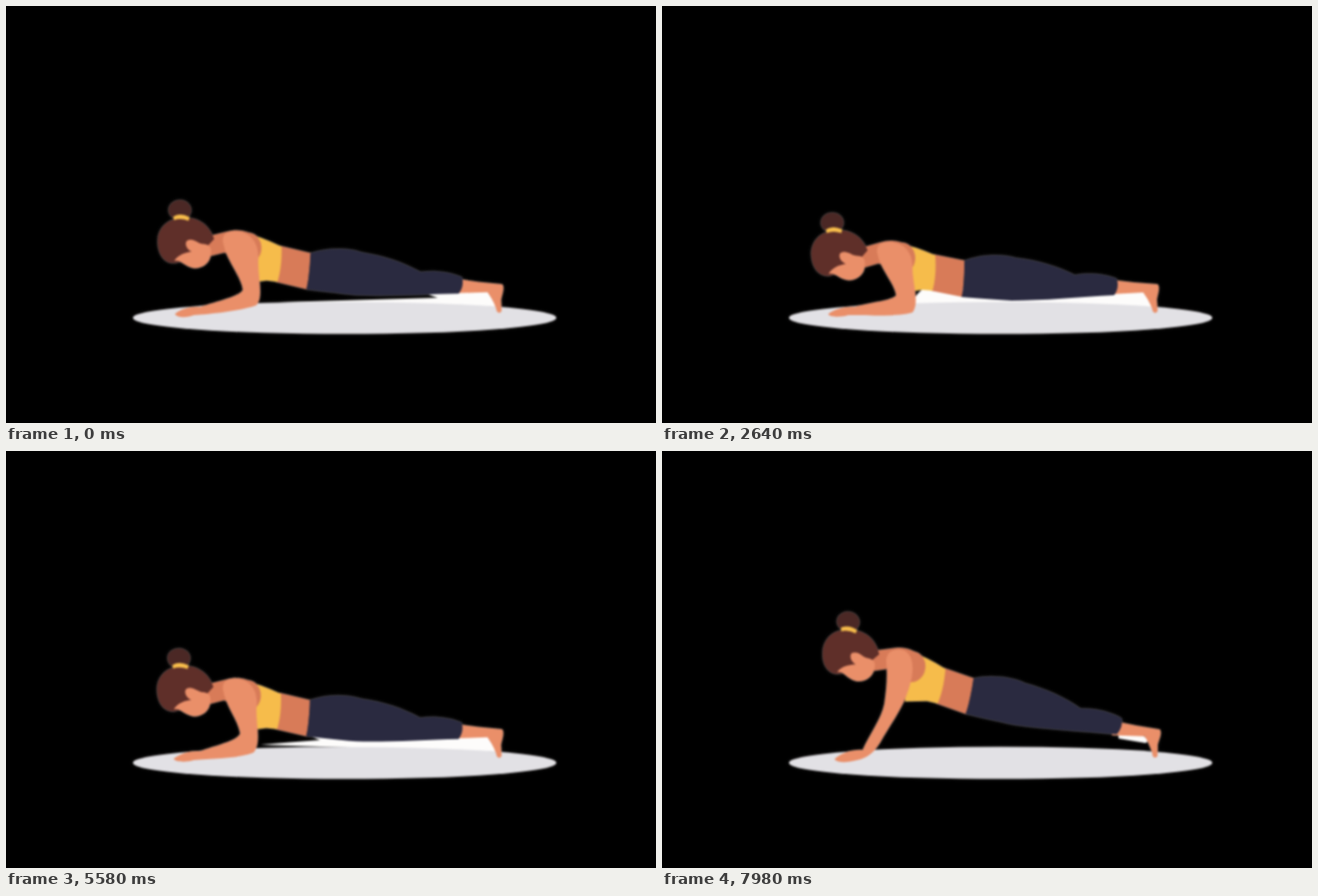
An HTML page without scripts for the animation above (8000 ms loop, 716 px wide and 460 px high).

```html
<!DOCTYPE html>
<html lang="en">
<head>
<meta charset="utf-8">
<title>Push-up</title>
<style>
  html, body { margin: 0; width: 100%; height: 100%; overflow: hidden; background: #000; }
  svg { display: block; width: 716px; height: 460px; }
  .scene { filter: blur(1.1px) drop-shadow(0 0 1.5px #4a4848); }
  .mat { fill: #e2e1e5; }
  .light { fill: #fdfcfb; }
  .skin { fill: #ea8f69; }
  .shade { fill: #d87b58; }
  .hair { fill: #5f2f29; }
  .bun { fill: #4b2825; }
  .top { fill: #f6bc4b; }
  .pants { fill: #2a2a40; }
</style>
</head>
<body>
<svg viewBox="0 0 716 460">
  <g class="scene">
    <!-- lit floor under the body -->
    <path class="light">
      <animate attributeName="d" dur="8s" repeatCount="indefinite"
        keyTimes="0; .09; .56; .6975; .8075; .94; 1"
        values="M450 312 L530 314 L541 332 L300 327 L476 322Z;
                M288 311 L530 314 L541 332 L270 340 L274 326Z;
                M288 311 L530 314 L541 332 L270 340 L274 326Z;
                M335 314 L530 314 L541 332 L280 324 L346 319Z;
                M432 308 L530 314 L541 332 L405 329 L422 324Z;
                M503 308 L530 314 L536 319 L533 322 L503 317Z;
                M503 308 L530 314 L536 319 L533 322 L503 317Z"/>
    </path>
    <ellipse class="mat" cx="373" cy="344" rx="233" ry="17.6"/>

    <!-- foot and body pivot on the toes -->
    <g>
      <animateTransform attributeName="transform" type="rotate" dur="8s" repeatCount="indefinite"
        calcMode="spline" keyTimes="0; .23; .4; .8075; 1"
        keySplines=".33 .72 .67 1; 0 0 1 1; .33 0 .67 0; .25 .43 .6 1"
        values="1.4 545 335; 0 545 335; 0 545 335; 2.6 545 335; 5 545 335"/>
      <path class="skin" d="M494 302 L520 305 L546 307 C549 311 546 318 545 324 L546 336 C545 340 540 339 540 334 C537 326 533 320 530 316 L494 318Z"/>
    </g>
    <g>
      <animateTransform attributeName="transform" type="rotate" dur="8s" repeatCount="indefinite"
        calcMode="spline" keyTimes="0; .23; .4; .8075; 1"
        keySplines=".33 .72 .67 1; 0 0 1 1; .33 0 .67 0; .25 .43 .6 1"
        values="2.25 545 335; 0 545 335; 0 545 335; 4.3 545 335; 8.3 545 335"/>
      <path class="shade" d="M299 274 L334 281 L331 321 L296 314Z"/>
      <path class="pants" d="M333 281 C350 274 375 273 390 278 C415 281 435 287 455 297 C470 294 490 296 501 301 C503 307 502 314 498 319 C460 321 420 325 385 325 C365 324 345 322 330 321 C333 308 333 294 333 281Z"/>
      <path class="top" d="M258 261 Q278 265 301 275 C302 290 301 303 298 314 L286 313 L262 317Z"/>
      <path class="shade" d="M212 269 L240 261 C252 257 264 259 274 266 L262 288 L238 284 L221 289Z"/>
      <ellipse class="shade" cx="264" cy="278" rx="15" ry="17"/>
      <g transform="translate(1.5 1.5)">
        <ellipse class="bun" cx="186" cy="237.5" rx="12.5" ry="11"/>
        <path class="hair" d="M225 268 C218 250 203 244 188 246 C170 248 162 261 163 274 C164 288 172 298 184 296 L206 288 L218 276Z"/>
        <path class="top" d="M179 245 Q187 240 197 245 L196 249 Q187 246 180 249Z"/>
        <path class="skin" d="M195 271 C192 275 196 281 201 283 C194 284 186 287 182 294 C190 292 192 299 204 301 C214 301 222 294 222 284 C223 277 219 274 213 274 C207 274 202 267 195 271Z"/>
      </g>
    </g>

    <path class="skin">
      <animate attributeName="d" dur="8s" repeatCount="indefinite"
        calcMode="spline" keyTimes="0; .23; .4; .8075; 1"
        keySplines=".33 .72 .67 1; 0 0 1 1; .33 0 .67 0; .25 .43 .6 1"
        values="M239 260 C242 280 259 297 261 313 C259 320 232 326 214 332 C204 331 192 334 186 340 C190 345 202 343 207 341 C228 340 264 335 276 330 C284 321 277 296 278 280 C279 258 266 248 252 248 C243 248 238 252 239 260Z;
                M237 272 C240 290 256 305 258 319 C255 325 228 327 212 332 C203 331 190 334 183 340 C186 344 200 343 205 341 C225 341 262 343 276 338 C284 328 276 305 276 290 C277 270 264 260 250 260 C241 260 236 264 237 272Z;
                M237 272 C240 290 256 305 258 319 C255 325 228 327 212 332 C203 331 190 334 183 340 C186 344 200 343 205 341 C225 341 262 343 276 338 C284 328 276 305 276 290 C277 270 264 260 250 260 C241 260 236 264 237 272Z;
                M242 249 C244 266 257 286 258 300 C255 312 232 322 216 330 C206 329 195 333 187 339 C190 344 203 343 209 341 C232 336 256 332 268 324 C278 312 273 290 276 270 C281 248 269 236 255 236 C246 236 241 241 242 249Z;
                M247 232 C249 248 247 265 245 279 C242 295 229 312 221 330 C210 329 197 333 190 340 C194 345 207 343 215 341 C226 339 234 332 240 322 C249 305 265 285 272 262 C280 238 276 220 262 219 C253 218 247 223 247 232Z"/>
    </path>
  </g>
</svg>
</body>
</html>
```
